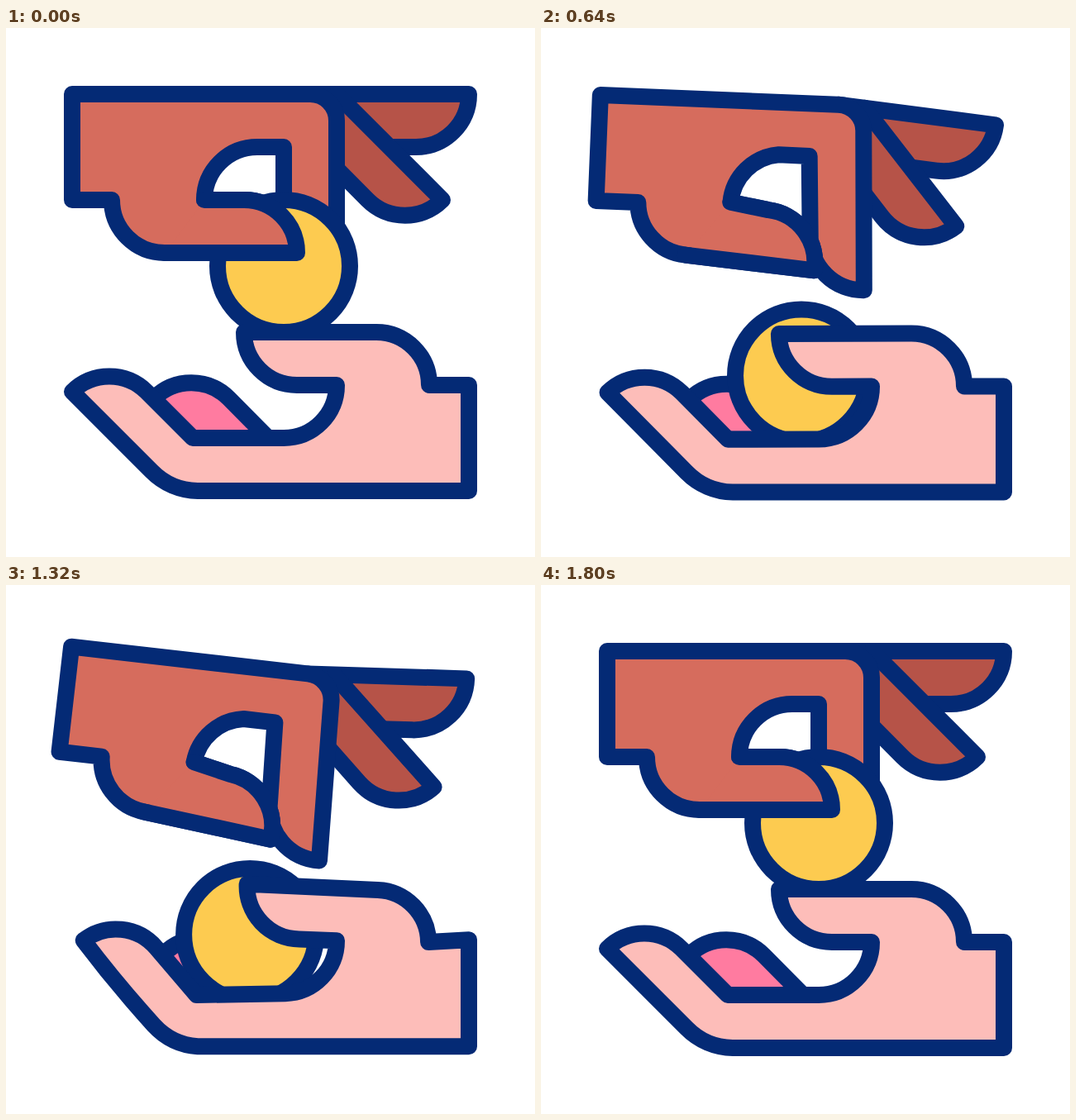
Recreate the animation shown at these times as an HTML page without scripts. Size 640 by 640 pixels, loop 2000 ms.

```html
<!DOCTYPE html>
<html lang="en">
<head>
<meta charset="utf-8">
<title>Giving a coin</title>
<style>
  html, body { margin: 0; width: 100%; height: 100%; overflow: hidden; background: #fff; }
  svg { display: block; width: 100%; height: 100%; }

  path, circle { stroke: #042a75; stroke-width: 20; stroke-linejoin: round; stroke-linecap: round; }
  .back { fill: #b65348; transform-origin: 368px 80px; }
  .hand, .thumb { fill: #d66c5d; }
  .coin { fill: #fdcb50; }
  .palm { fill: #fdbdb9; }
  .little { fill: #ff7ba0; }

  .giver, .back, .hand, .thumb, .coin, .taker, .palm, .little {
    animation: 2s cubic-bezier(.333, 0, .667, 1) infinite;
  }
  .giver { transform-origin: 80px 80px; animation-name: shift, tilt; }
  .upper { animation-name: flick-upper; }
  .lower { animation-name: flick-lower; }
  .hand { animation-name: grip; }
  .thumb { animation-name: thumb; }
  .coin { animation-name: coin-x, coin-y; }
  .taker { animation-name: bob; }
  .palm { animation-name: palm; }
  .little { animation-name: little; }

  /* giving hand: whole-hand motion, then the two free fingers */
  @keyframes shift {
    0%, 2%, 90%, 100% { translate: 0 0; }
    20% { translate: -29px 21.5px; }
    38%, 60% { translate: -1px -6px; }
  }
  @keyframes tilt {
    0%, 2%, 90%, 100% { rotate: 0deg; }
    20% { rotate: -5.8deg; }
    40.5%, 61% { rotate: 7.1deg; }
  }
  @keyframes flick-upper {
    0%, 2%, 90%, 100% { rotate: 0deg; }
    20% { rotate: -12.6deg; }
    36% { rotate: 8.2deg; }
    54%, 60% { rotate: -5.3deg; }
  }
  @keyframes flick-lower {
    0%, 2%, 90%, 100% { rotate: 0deg; }
    20% { rotate: -9.5deg; }
    35% { rotate: 6.5deg; }
    54%, 60% { rotate: -3.6deg; }
  }

  /* index finger bends first, then the thumb opens */
  @keyframes grip {
    0%, 2%, 90%, 100% {
      d: path("M80 80L368 80A32 32 0 0 1 400 112L400 304A64 64 0 0 1 336 240L336 144L304 144A64 64 0 0 0 240 208L288 208A64 64 0 0 1 352 272L192 272A64 64 0 0 1 128 208L80 208Z");
    }
    20%, 22% {
      d: path("M80 80L368 80A32 32 0 0 1 400 112L409 303A64 64 0 0 1 342 243L337 145L304 144A64 64 0 0 0 240 208L288 208A64 64 0 0 1 352 272L192 272A64 64 0 0 1 128 208L80 208Z");
    }
    38%, 63% {
      d: path("M80 80L368 80A32 32 0 0 1 400 112L408 303A64 64 0 0 1 340 240L335 143L296 143A64 64 0 0 0 244 201L289 212A64 64 0 0 1 345 286L190 268A64 64 0 0 1 132 208L80 208Z");
    }
    76.5% {
      d: path("M80 80L368 80A32 32 0 0 1 400 112L403 304A64 64 0 0 1 338 241L336 144L304 144A64 64 0 0 0 240 208L288 208A64 64 0 0 1 352 272L192 272A64 64 0 0 1 128 208L80 208Z");
    }
  }
  @keyframes thumb {
    0%, 22%, 76.5%, 100% { d: path("M240 208L288 208A64 64 0 0 1 352 272L192 272"); }
    38%, 63% { d: path("M244 201L289 212A64 64 0 0 1 345 286L190 268"); }
  }

  @keyframes coin-x {
    0%, 2%, 88%, 100% { cx: 336px; }
    20%, 22% { cx: 327px; }
    48%, 61% { cx: 291px; }
  }
  @keyframes coin-y {
    0%, 2%, 90%, 100% { cy: 288px; }
    20% { cy: 282.5px; }
    21.5% { cy: 282.5px; animation-timing-function: cubic-bezier(.4, 0, .8, .85); }
    32% { cy: 420px; animation-timing-function: cubic-bezier(.2, .6, .6, 1); }
    40% { cy: 443.5px; }
    54%, 63.5% { cy: 426.5px; }
  }

  /* receiving hand: sinks under the coin, later lifts it back */
  @keyframes bob {
    0%, 30%, 54%, 64%, 90%, 100% { translate: 0 0; }
    41% { translate: 0 16.5px; }
    76% { translate: 0 -23px; }
  }
  @keyframes palm {
    0%, 30.5%, 89%, 100% {
      d: path("M288 368L448 368A64 64 0 0 1 512 432L560 432L560 560L232 560A80 80 0 0 1 176 536Q128 488 80 440A64 64 0 0 1 170 440L226 496L336 496A64 64 0 0 0 400 432L352 432A64 64 0 0 1 288 368Z");
    }
    43% {
      d: path("M286 381L450 368A64 64 0 0 1 512 432L560 432L560 560L232 560A80 80 0 0 1 178 534Q135 481 92 427A64 64 0 0 1 182 438L231 500L340 496A64 64 0 0 0 400 432L352 439A64 64 0 0 1 286 381Z");
    }
    54%, 61% {
      d: path("M292 363L450 371A64 64 0 0 1 511 434L560 431L560 560L232 560A80 80 0 0 1 179 534Q134 484 95 431A64 64 0 0 1 183 441L231 498L338 496A64 64 0 0 0 400 432L355 430A64 64 0 0 1 292 363Z");
    }
  }
  @keyframes little {
    0%, 30.5%, 89%, 100% { translate: 0 0; }
    43%, 61% { translate: 13px 0; }
  }
</style>
</head>
<body>
<svg viewBox="0 0 640 640">
  <g class="giver">
    <path class="back upper" d="M368 80H560A64 64 0 0 1 496 144H450Z"/>
    <path class="back lower" d="M400 80L528 208A64 64 0 0 1 437.5 208L376 146Z"/>
    <path class="hand"/>
  </g>
  <g class="taker">
    <path class="little" d="M179 448A64 64 0 0 1 269.5 448L317 496H226L170 462Z"/>
  </g>
  <circle class="coin" r="80"/>
  <g class="giver">
    <path class="thumb"/>
  </g>
  <g class="taker">
    <path class="palm"/>
  </g>
</svg>
</body>
</html>
```
